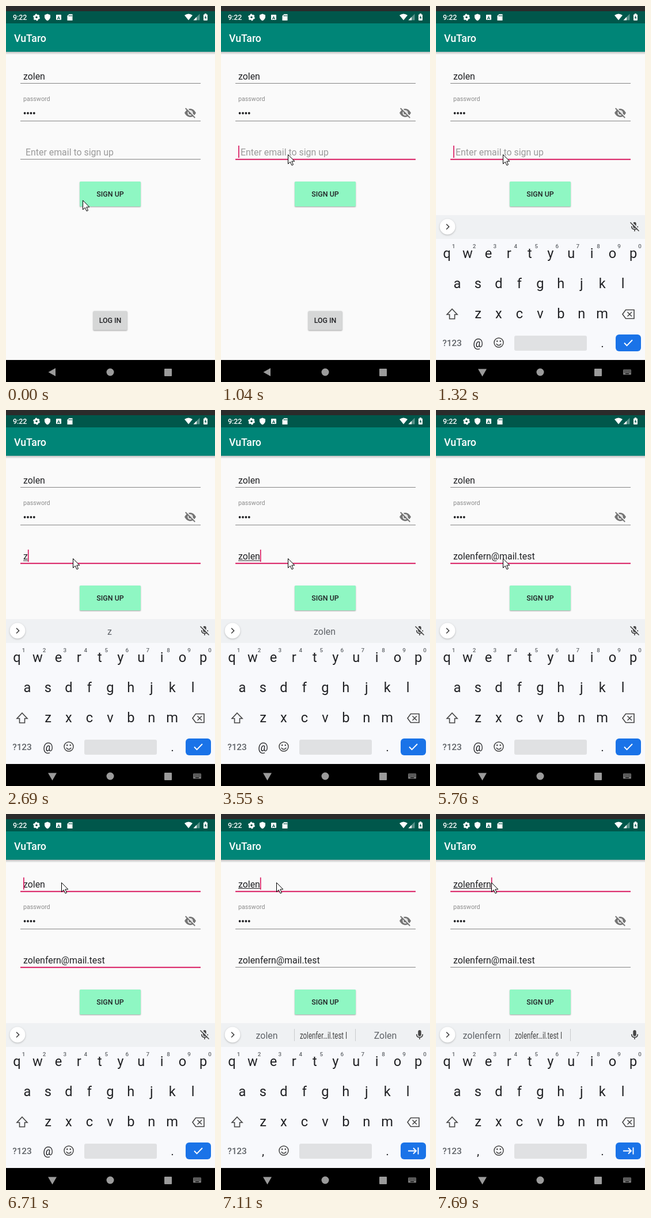
Recreate the animation shown at these times as an HTML page with a canvas. Size 363x649 px, loop 8 s.

```html
<!DOCTYPE html>
<html lang="en">
<head>
<meta charset="utf-8">
<title>Sign up</title>
<style>
html, body { margin: 0; width: 100%; height: 100%; overflow: hidden; background: #fafafa; }
canvas { display: block; }
</style>
</head>
<body>
<canvas id="stage" width="363" height="649"></canvas>
<script>
const ctx = document.getElementById('stage').getContext('2d');
const LOOP = 8000;
const NAME = 'zolen';
const LOGIN = 'zolenfern';
const EMAIL = LOGIN + '@mail.test';
const PINK = '#d81b60', GREY = '#5f6368', INK = '#202124';

// ---- helpers ----

// value of the last [time, value] pair that has been reached
function at(t, steps) {
  let value = steps[0][1];
  for (const [time, v] of steps) if (t >= time) value = v;
  return value;
}

function rect(x, y, w, h, color, r = 0) {
  ctx.fillStyle = color;
  ctx.beginPath();
  ctx.roundRect(x, y, w, h, r);
  ctx.fill();
}

function circle(x, y, r, color) {
  ctx.fillStyle = color;
  ctx.beginPath();
  ctx.arc(x, y, r, 0, Math.PI * 2);
  ctx.fill();
}

function text(s, x, y, size, color, align = 'left', weight = 400) {
  ctx.font = `${weight} ${size}px Roboto, sans-serif`;
  ctx.textAlign = align;
  ctx.fillStyle = color;
  ctx.fillText(s, x, y);
}

function fillPath(d, x, y, color) {
  ctx.save();
  ctx.translate(x, y);
  ctx.fillStyle = color;
  ctx.fill(new Path2D(d), 'evenodd');
  ctx.restore();
}

function linePath(d, x, y, color, width) {
  ctx.save();
  ctx.translate(x, y);
  ctx.strokeStyle = color;
  ctx.lineWidth = width;
  ctx.stroke(new Path2D(d));
  ctx.restore();
}

function shadowed(blur, offset, alpha, draw) {
  ctx.save();
  ctx.shadowColor = `rgba(0,0,0,${alpha})`;
  ctx.shadowBlur = blur;
  ctx.shadowOffsetY = offset;
  draw();
  ctx.restore();
}

// ---- app screen ----

function drawStatusBar() {
  rect(0, 0, 363, 9, '#2b2b2b');
  rect(0, 9, 363, 21, '#00574b');
  text('9:22', 12, 24, 12.4, '#fff', 'left', 500);

  ctx.save();
  ctx.strokeStyle = '#fff';
  ctx.lineWidth = 3;
  ctx.beginPath();
  ctx.arc(53, 19.5, 3.3, 0, Math.PI * 2);
  ctx.stroke();
  ctx.lineWidth = 1.8;
  ctx.setLineDash([2.8, 2.4]);
  ctx.beginPath();
  ctx.arc(53, 19.5, 5, 0, Math.PI * 2);
  ctx.stroke();
  ctx.restore();

  fillPath('M0-6L5-4V0Q4 4 0 6Q-4 4-5 0V-4Z', 72, 19.5, '#fff');
  rect(87, 15, 9, 9, '#fff', 1);
  text('A', 91.5, 22.5, 8, '#00574b', 'center', 700);
  fillPath('M-1.5-5.5H4.5V5.5H-4.5V-2.5Z', 111, 19.5, '#fff');
  for (let i = 0; i < 3; i++) rect(109 + i * 2.2, 15.5, 1.1, 2.5, '#00574b');

  fillPath('M0 5.5L-7-3Q0-8 7-3Z', 317, 19, '#fff');
  fillPath('M5.5-5.5V5.5H-5.5Z', 331, 19, 'rgba(255,255,255,.35)');
  fillPath('M0 0V5.5H-5.5Z', 331, 19, '#fff');
  rect(343, 14.5, 7, 10.5, '#fff', 1);
  rect(345, 13, 3, 2, '#fff');
  fillPath('M.6-3.5L-2 .6H0V3.5L2-.6H.6Z', 346.5, 20, '#00574b');
}

function drawToolbar() {
  const shade = ctx.createLinearGradient(0, 79, 0, 84);
  shade.addColorStop(0, 'rgba(0,0,0,.24)');
  shade.addColorStop(1, 'rgba(0,0,0,0)');
  ctx.fillStyle = shade;
  ctx.fillRect(0, 79, 363, 5);
  rect(0, 30, 363, 49, '#008577');
  text('VuTaro', 14, 62, 17.7, '#fff', 'left', 500);
}

function drawEyeOff() {
  fillPath('M-10 0Q-6-7.3 0-7.3T10 0Q6 7.3 0 7.3T-10 0Z', 320, 184.5, '#757575');
  circle(320, 184.5, 4.5, '#fafafa');
  circle(320, 184.5, 2.8, '#757575');
  linePath('M-7.3-9.3L9.3 7.3', 320, 184.5, '#fafafa', 1.8);
  linePath('M-8.5-8L8-8L8 8M-8.5-8L8 8.5', 320, 184.5, 'transparent', 1);
  linePath('M-8.3-8L8.2 8.5', 320, 184.5, '#757575', 1.8);
}

function drawField({ value, baseline, lineY, focused, caret, composing, hint }) {
  if (focused) rect(25, lineY - 0.2, 313, 2, PINK);
  else rect(25, lineY, 313, 1, '#858585');
  if (value) text(value, 30, baseline, 15.9, INK);
  else if (hint) text(hint, 34, baseline, 15.9, '#9a9a9a');
  ctx.font = '400 15.9px Roboto, sans-serif';
  if (composing) rect(30, baseline + 1.6, ctx.measureText(value).width, 1, INK);
  if (caret !== null) {
    const x = 30 + ctx.measureText(value.slice(0, caret)).width;
    rect(x, baseline - 17, 1.7, 21, PINK);
  }
}

function drawButton(label, x, y, w, h, color) {
  shadowed(2, 1, 0.35, () => rect(x, y, w, h, color, 1.5));
  text(label, x + w / 2, y + h / 2 + 4.4, 12.4, INK, 'center', 500);
}

// ---- keyboard ----

function drawMic(off) {
  const x = 345, y = 381;
  rect(x - 2.7, y - 8, 5.4, 10.5, '#444', 2.7);
  linePath('M-5.3-1Q-5.3 4.5 0 4.5T5.3-1M0 4.5V8', x, y, '#444', 1.6);
  if (off) {
    linePath('M-6-8.5L8.5 6', x, y, '#eff1f3', 1.8);
    linePath('M-7.5-7.5L7.5 7.5', x, y, '#444', 1.6);
  }
}

function drawSuggestions(words) {
  if (words.length === 1) {
    text(words[0], 180, 388, 15.9, GREY, 'center');
    return;
  }
  words.forEach((word, i) => {
    if (word.includes('…')) {
      // long entries are set in a condensed face
      ctx.save();
      ctx.translate(178, 388);
      ctx.scale(0.72, 1);
      text(word, 0, 0, 15.9, '#444', 'center');
      ctx.restore();
    } else {
      text(word, 79.5 + i * 103, 388, 15.9, GREY, 'center');
    }
  });
  if (words.length) for (const x of [127, 233]) rect(x, 371, 1, 21, '#c8cacd');
}

function drawKeyRow(letters, x, y) {
  [...letters].forEach((c, i) => text(c, x + i * 35.95, y, 23.6, INK, 'center'));
}

function drawKeyboard(emailMode, words) {
  rect(0, 361, 363, 41, '#eff1f3');
  rect(0, 402, 363, 209, '#f8f9fc');
  shadowed(3, 1, 0.25, () => circle(20, 381, 13.5, '#fff'));
  linePath('M-2-4.5L2.5 0L-2 4.5', 20, 381, '#444', 1.7);
  drawMic(emailMode);
  drawSuggestions(words);

  drawKeyRow('qwertyuiop', 19, 435);
  [...'1234567890'].forEach((d, i) =>
    text(d, 30.5 + i * 35.95, 417.5, 9.8, GREY, 'center', 500));
  drawKeyRow('asdfghjkl', 37, 487);
  drawKeyRow('zxcvbnm', 73, 539);

  linePath('M0-9L9 0.5H4.5V8H-4.5V0.5H-9Z', 28, 532, '#444', 1.6);
  linePath('M-10 0L-4.5-7.5H10V7.5H-4.5ZM-1.5-3.7L6 3.7M6-3.7L-1.5 3.7', 334, 532, '#444', 1.6);

  text('?123', 28, 587, 15.4, GREY, 'center', 500);
  text(emailMode ? '@' : ',', 73, 589, emailMode ? 19.5 : 21, INK, 'center');
  linePath('M8 0A8 8 0 1 1-8 0A8 8 0 1 1 8 0M-4.3 2Q0 7.5 4.3 2', 109, 581, '#444', 1.5);
  circle(106.2, 578.6, 1.3, '#444');
  circle(111.8, 578.6, 1.3, '#444');
  rect(136, 569, 126, 26, '#e0e1e3', 3);
  text('.', 289, 589, 21, INK, 'center');

  rect(312, 567, 44, 29, '#1a73e8', 6);
  const icon = emailMode ? 'M-7 0L-2.5 4.7L7-5' : 'M-9 0H5M0-5L5 0L0 5M8.5-6V6';
  linePath(icon, 334, 581.5, '#fff', 1.9);
}

function drawNavBar(keyboardUp) {
  const color = '#9b9b9b';
  rect(0, 611, 363, 38, '#000');
  fillPath(keyboardUp ? 'M-7.5-5.5H7.5L0 7.5Z' : 'M-7 0L5.5-7V7Z', 80.5, 632, color);
  circle(181, 632, 6.5, color);
  rect(275, 626, 13, 13, color, 1);
  if (!keyboardUp) return;
  rect(325, 627.5, 14, 9, '#777', 1);
  for (let i = 0; i < 5; i++)
    for (let j = 0; j < 2; j++) rect(326.5 + i * 2.5, 629 + j * 2.5, 1.2, 1.2, '#000');
  rect(329, 634, 6, 1.2, '#000');
}

function drawPointer([x, y]) {
  const arrow = 'M.5.5V16.5L4.2 13L7 19L9.5 17.9L6.8 12H11.8Z';
  fillPath(arrow, x, y, '#fff');
  linePath(arrow, x, y, '#000', 1);
}

// ---- timeline ----

function pointerAt(t) {
  if (t < 5918) {
    return at(t, [[0, [133, 335]], [150, [127, 301]], [290, [120, 266]],
                  [430, [116, 251]], [740, [116, 256]]]);
  }
  const step = Math.min(5, Math.floor((t - 5918) / 158.4) + 1);
  const p = step / 5, ease = p * p * (3 - 2 * p);
  return [116 - 20 * ease, 256 - 138 * ease];
}

function emailAt(t) {
  const length = at(t, [
    [0, 0], [2690, 1], [2840, 2], [2990, 4],
    [3550, 5], [3690, 6], [3830, 7], [3970, 9], [4250, 10],
    [4500, 11], [4636, 12], [4772, 13], [4908, 14], [5044, 16], [5180, 19]]);
  return EMAIL.slice(0, length);
}

function nameAt(t) {
  return LOGIN.slice(0, at(t, [[0, NAME.length], [7390, 6], [7540, 8], [7690, 9]]));
}

function suggestionsAt(t, email, name) {
  if (t >= 7110) {
    const words = [name, 'zolenfer…il.test I'];
    return t < 7690 ? [...words, 'Zolen'] : words;
  }
  if (t < 2690 || t >= 4250) return [];
  return t >= 2990 && t < 3550 ? [email, NAME] : [email];
}

function draw(t) {
  const email = emailAt(t), name = nameAt(t);
  const onName = t >= 6710;
  const emailCaret = at(t, [[0, false], [1040, true], [1450, false], [1850, true],
    [2280, false], [2690, true], [5760, false], [6235, true], [6710, false]]);

  rect(0, 0, 363, 649, '#fafafa');
  drawToolbar();
  drawStatusBar();

  drawField({
    value: name, baseline: 126.5, lineY: 133, focused: onName,
    caret: onName ? (t < 6840 ? 0 : name.length) : null,
    composing: t >= 7110
  });
  text('password', 30, 164, 10.7, '#8c8c8c');
  for (let i = 0; i < 4; i++) circle(32.6 + i * 5.4, 185, 1.9, INK);
  rect(25, 198, 313, 1, '#858585');
  drawEyeOff();
  drawField({
    value: email, baseline: 258, lineY: 264, focused: t >= 740 && t < 6840,
    caret: emailCaret ? email.length : null,
    composing: t >= 2690 && t < 4250, hint: 'Enter email to sign up'
  });

  drawButton('SIGN UP', 128, 303, 106, 43, '#8ff7c3');
  drawButton('LOG IN', 151.5, 526.5, 59, 33, '#d6d7d7');

  const keyboardUp = t >= 1170;
  if (keyboardUp) {
    const rising = t < 1320;
    ctx.save();
    ctx.globalAlpha = rising ? 0.7 : 1;
    ctx.translate(0, rising ? 55 : 0);
    drawKeyboard(t < 6840, suggestionsAt(t, email, name));
    ctx.restore();
  }
  drawNavBar(keyboardUp);
  drawPointer(pointerAt(t));
}

const start = performance.now();
function tick() {
  draw((performance.now() - start) % LOOP);
  requestAnimationFrame(tick);
}
tick();
</script>
</body>
</html>
```
